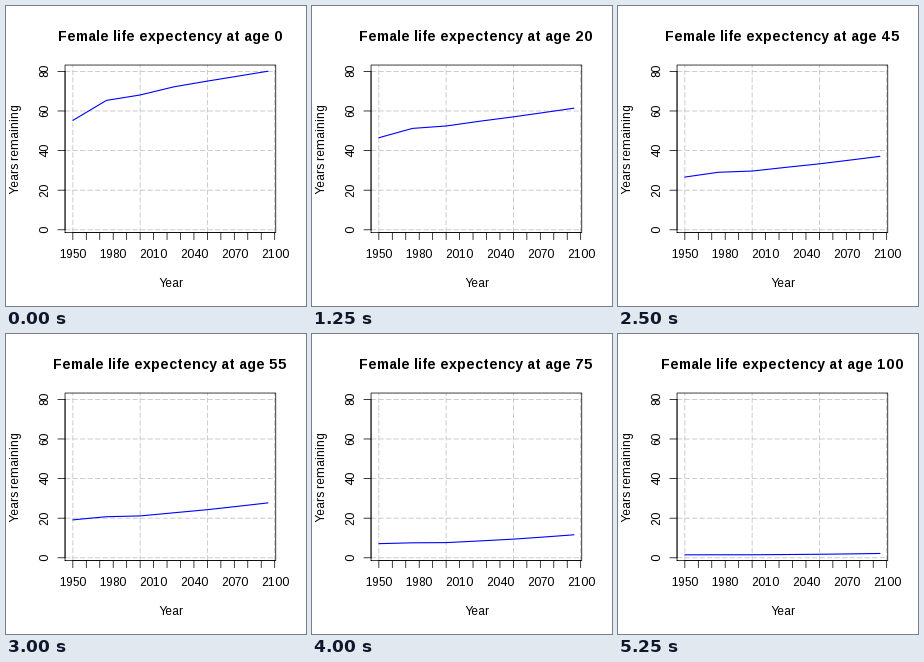
Write a matplotlib script that moves like this. It is 300 px wide and 300 px high and loops after 5.5 s.

```python
import matplotlib.pyplot as plt
import numpy as np
from matplotlib.animation import FuncAnimation

# Whole-pixel letter advances
plt.rcParams["text.hinting"] = "force_autohint"
plt.rcParams["text.hinting_factor"] = 1

SIZE, DPI = 300, 100
PT = 72 / DPI  # points per pixel
LEFT, RIGHT, TOP, BOTTOM = 59.04, 269.76, 59.04, 226.56
XLIM, YLIM = (1944.2, 2100.8), (-1.4, 83.2)
TICK = 7.2

AGES = [0, 1, *range(5, 101, 5)]
YEARS = np.arange(1950, 2100, 5)

# Mortality at a few key years, linear in between
KEY_YEARS = [1950, 1975, 2000, 2025, 2050, 2095]
SLOPE = np.interp(YEARS, KEY_YEARS, [0.81, 0.905, 0.93, 0.95, 0.965, 0.985])
LIFESPAN = np.interp(YEARS, KEY_YEARS, [77.3, 76.5, 76.3, 77.65, 79.05, 82.3])
INFANT_LOSS = np.interp(YEARS, KEY_YEARS, [7.4, 3.9, 2.9, 1.6, 1.2, 1.0])
SPREAD, FLOOR = 10.8, 1.1


def px(year):
    return LEFT + (year - XLIM[0]) / (XLIM[1] - XLIM[0]) * (RIGHT - LEFT)


def py(value):
    return BOTTOM - (value - YLIM[0]) / (YLIM[1] - YLIM[0]) * (BOTTOM - TOP)


def expectancy(age):
    """Falls steadily with age, then levels off softly past the lifespan."""
    adult = SLOPE * SPREAD * np.logaddexp(0, (LIFESPAN - age) / SPREAD)
    return np.hypot(adult, FLOOR) - INFANT_LOSS * np.exp(-1.5 * age)


fig = plt.figure(figsize=(SIZE / DPI, SIZE / DPI), dpi=DPI, facecolor="white")
ax = fig.add_axes([0, 0, 1, 1])
ax.set(xlim=(0, SIZE), ylim=(SIZE, 0))
ax.axis("off")


def stroke(xs, ys, color="black", width=0.75, **style):
    return ax.plot(xs, ys, color=color, lw=width * PT, snap=False,
                   solid_capstyle="round", solid_joinstyle="round", **style)[0]


def label(x, y, text, size=12, **style):
    return ax.text(x, y, text, fontsize=size * PT, family="Liberation Sans",
                   ha="center", va="baseline", rotation_mode="anchor", **style)


# Grid
for value in range(0, 81, 20):
    stroke([LEFT, RIGHT], [py(value)] * 2, "#bebebe", ls=(0, (7, 3)))
for year in range(1950, 2101, 50):
    stroke([px(year)] * 2, [BOTTOM, TOP], "#bebebe", ls=(0, (7, 3)))

# Frame and axes
stroke([LEFT, RIGHT, RIGHT, LEFT, LEFT], [BOTTOM, BOTTOM, TOP, TOP, BOTTOM])
stroke([px(1950), px(2100)], [BOTTOM] * 2)
stroke([LEFT] * 2, [py(0), py(80)])
for year in range(1950, 2101, 10):
    stroke([px(year)] * 2, [BOTTOM, BOTTOM + TICK])
for year in range(1950, 2101, 30):
    label(px(year), 252, str(year))
for value in range(0, 81, 20):
    stroke([LEFT, LEFT - TICK], [py(value)] * 2)
    label(42, py(value) - 0.5, str(value), rotation=90)

center = (LEFT + RIGHT) / 2
label(center, 281, "Year")
label(13, (TOP + BOTTOM) / 2, "Years remaining", rotation=90)
title = label(center, 35, "", 14.4, weight="bold")
curve = stroke([], [], "blue", 1.1, zorder=3)


def update(i):
    title.set_text(f"Female life expectency at age {AGES[i]}")
    curve.set_data(px(YEARS), py(expectancy(AGES[i])))
    return title, curve


anim = FuncAnimation(fig, update, frames=len(AGES), interval=250,
                     repeat=True, repeat_delay=0)
plt.show()
```
